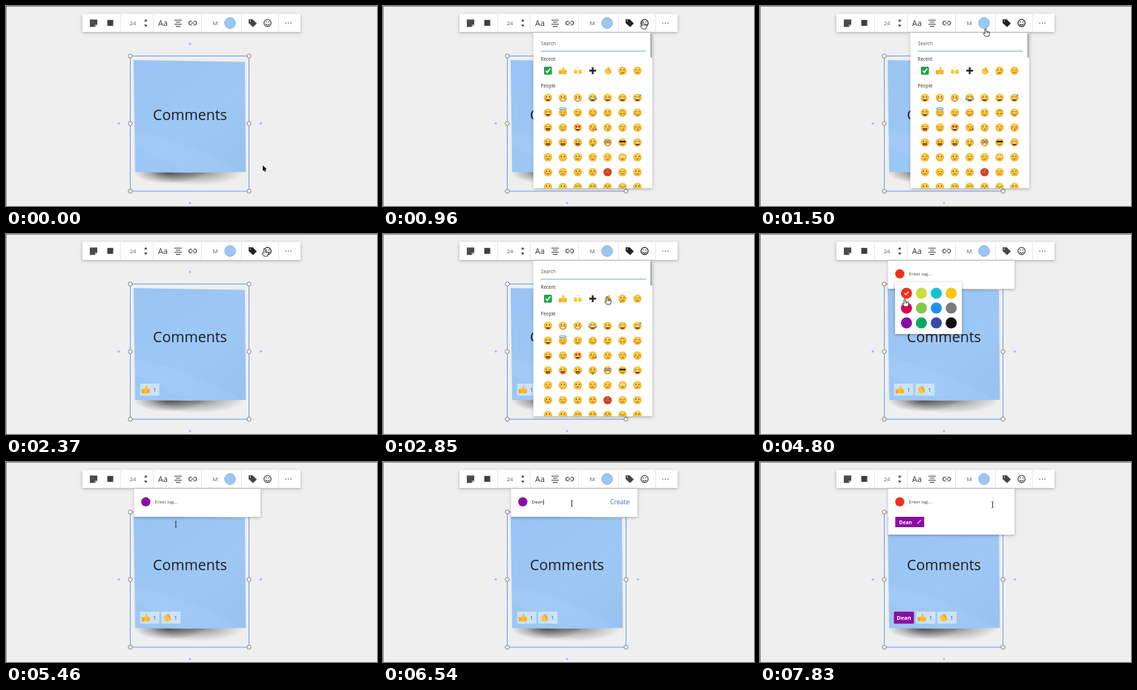
Animation of 500x270 px, one loop 7860 ms. Source, as an HTML page with a canvas:

```html
<!DOCTYPE html>
<html lang="en">
<head>
<meta charset="utf-8">
<title>Sticky note reactions and tags</title>
<style>
html, body { margin: 0; width: 100%; height: 100%; overflow: hidden; background: #efefef; }
canvas { display: block; width: 500px; height: 270px; }
</style>
</head>
<body>
<canvas id="stage"></canvas>
<script>
const LOOP = 7860, TAU = Math.PI * 2;
const FONT = '"Open Sans", "Noto Sans", sans-serif';
const NAME = 'Dean';
const BLUE = '#9cc6f4', RED = '#f0301a', VIOLET = '#890fa2', INK = '#3c3c3c';
const canvas = document.getElementById('stage');
const c = canvas.getContext('2d');
const dpr = window.devicePixelRatio || 1;
canvas.width = 500 * dpr;
canvas.height = 270 * dpr;

// time, x, y, pointer kind (a: arrow, h: hand, i: text)
const PATH = [
  [0, 346, 215, 'a'], [250, 346, 215, 'a'], [780, 350, 21, 'h'],
  [1250, 350, 21, 'h'], [1500, 304, 31, 'h'], [1730, 242, 85, 'h'],
  [1880, 242, 85, 'h'], [2300, 348, 20, 'h'], [2540, 348, 20, 'h'],
  [2850, 302, 85, 'h'], [3020, 302, 85, 'a'], [3400, 343, 41, 'a'],
  [3540, 343, 41, 'a'], [3720, 332, 21, 'h'], [4020, 332, 21, 'h'],
  [4350, 188, 54, 'h'], [4520, 188, 54, 'h'], [4720, 195, 88, 'h'],
  [4850, 195, 88, 'h'], [5120, 197, 119, 'h'], [5300, 197, 119, 'i'],
  [5600, 254.5, 56, 'i'], [6570, 254.5, 56, 'i'], [6820, 318, 54, 'h'],
  [6990, 318, 54, 'i'], [7200, 313.5, 57.5, 'i'], [LOOP, 313.5, 57.5, 'i']
];

const PALETTE = [
  RED, '#c4e33a', '#12c3d2', '#fbc40d',
  '#df0052', '#80cc45', '#2190f4', '#7a7a7a',
  VIOLET, '#10a566', '#3947a6', '#111111'
];

// eyes, mouth, optional extra
const FACES = [
  'oD ot ot ^Dt oD ^D ^Ds',
  'xD u)a w) ^)b o) o)v ^)b',
  '^T u) hD w*k o* ^* u*b',
  'wT xT oT o)$ gt s) ^D',
  '-/ o. o- -- -/ r- o/',
  'o-b u( o( x( x(R u( o/',
  'o( o( x( x( xO uO x('
].map(row => row.split(' '));

function fill(color) { c.fillStyle = color; c.fill(); }
function line(color, w) { c.strokeStyle = color; c.lineWidth = w; c.stroke(); }
function disc(x, y, r, color) { c.beginPath(); c.arc(x, y, r, 0, TAU); fill(color); }
function ring(x, y, r, color, w) { c.beginPath(); c.arc(x, y, r, 0, TAU); line(color, w); }
function rect(x, y, w, h, color) { c.fillStyle = color; c.fillRect(x, y, w, h); }
function box(x, y, w, h, r, color) { c.beginPath(); c.roundRect(x, y, w, h, r); fill(color); }
function poly(color, ...p) {
  c.beginPath();
  for (let i = 0; i < p.length; i += 2) c.lineTo(p[i], p[i + 1]);
  c.closePath();
  fill(color);
}
function seg(color, w, ...p) {
  c.beginPath();
  for (let i = 0; i < p.length; i += 2) c.lineTo(p[i], p[i + 1]);
  line(color, w);
}
function arc(x, y, r, a, b, color, w) {
  c.beginPath();
  c.arc(x, y, r, a * Math.PI, b * Math.PI);
  line(color, w);
}
function text(s, x, y, size, color, align = 'left', weight = 400) {
  c.font = `${weight} ${size}px ${FONT}`;
  c.fillStyle = color;
  c.textAlign = align;
  c.fillText(s, x, y);
}
function at(x, y, scale, draw) {
  c.save();
  c.translate(x, y);
  c.scale(scale, scale);
  draw();
  c.restore();
}
function card(x, y, w, h) {
  c.save();
  c.shadowColor = 'rgba(0,0,0,.3)';
  c.shadowBlur = 4 * dpr;
  c.shadowOffsetY = dpr;
  rect(x, y, w, h, '#fff');
  c.restore();
}

function shade(x, y, rx, ry, alpha) {
  c.save();
  c.translate(x, y);
  c.scale(rx, ry);
  const g = c.createRadialGradient(0, 0, 0, 0, 0, 1);
  g.addColorStop(0, `rgba(30,25,25,${alpha})`);
  g.addColorStop(.5, `rgba(30,25,25,${alpha * .45})`);
  g.addColorStop(1, 'rgba(30,25,25,0)');
  disc(0, 0, 1, g);
  c.restore();
}

function note(textY) {
  shade(220, 224, 48, 16, .75);
  shade(258, 224, 64, 18, .5);
  const g = c.createLinearGradient(180, 74, 300, 225);
  g.addColorStop(0, '#99c4f3');
  g.addColorStop(.6, '#9dc7f5');
  g.addColorStop(1, '#98c3f1');
  c.beginPath();
  c.moveTo(172, 73);
  c.lineTo(322, 75.5);
  c.lineTo(323.3, 224);
  c.quadraticCurveTo(250, 226, 174, 224);
  c.closePath();
  fill(g);
  c.beginPath();
  c.moveTo(173, 168);
  c.quadraticCurveTo(235, 178, 318, 224);
  c.lineTo(240, 224);
  c.quadraticCurveTo(200, 200, 173, 190);
  fill('rgba(255,255,255,.05)');
  text('Comments', 248, textY, 19.6, '#1d1d1f', 'center');
}

function selection() {
  c.strokeStyle = '#6d9be6';
  c.lineWidth = 1;
  c.strokeRect(167.5, 67.5, 160, 182.5);
  for (const x of [167.5, 327.5]) for (const y of [67.5, 158.7, 250]) {
    disc(x, y, 2.7, '#fff');
    ring(x, y, 2.7, '#707070', .9);
  }
  for (const [x, y] of [[248, 51], [152, 158.5], [343.5, 158.5], [248, 266]])
    disc(x, y, 1.6, '#abb6f6');
}

function thumb() {
  c.beginPath();
  c.moveTo(-2.5, -.5);
  c.quadraticCurveTo(.2, -2.5, .2, -5.5);
  c.quadraticCurveTo(2.6, -6, 2, -1.2);
  c.lineTo(5, -1);
  c.quadraticCurveTo(6.2, .4, 5.2, 1.6);
  c.quadraticCurveTo(5.8, 4.8, 3.6, 5.3);
  c.lineTo(-2.5, 4.8);
  c.closePath();
  fill('#fcc12c');
  for (const y of [.9, 2.6, 4.1]) seg('#df9420', .5, 1.6, y, 5, y);
  box(-5.6, -.5, 3.4, 5.6, .8, '#f3a728');
}

function palm(angle, color) {
  c.save();
  c.rotate(angle);
  box(-2.6, -1, 5.4, 5.8, 2, color);
  c.lineCap = 'round';
  for (let i = 0; i < 4; i++)
    seg(color, 1.25, -1.9 + i * 1.35, 1, -2.2 + i * 1.5, -3.7 + Math.abs(i - 1.4) * .6);
  seg(color, 1.4, -2, 3, -3.9, .2);
  c.restore();
}
function clap() {
  at(1.2, -.2, 1, () => palm(-.5, '#e99b22'));
  at(-.4, .9, 1, () => palm(-.75, '#fdc735'));
  seg('#e7a02b', .7, 1.3, -5.6, 1.8, -4.2);
  seg('#e7a02b', .7, 4.2, -5.2, 3.6, -4);
}
function raised() {
  at(-3, 1, .72, () => palm(-.18, '#fcc12c'));
  at(3, 1, .72, () => { c.scale(-1, 1); palm(-.18, '#fcc12c'); });
  for (const x of [-1.2, 0, 1.2]) seg('#e3a33a', .5, x, -5, x * .7, -3.6);
}

const DARK = '#64420f';
const eyes = {
  o(x) { c.beginPath(); c.ellipse(x, -1.3, .7, 1, 0, 0, TAU); fill(DARK); },
  '^'(x) { arc(x, -.8, 1, 1, 2, DARK, .7); },
  u(x) { arc(x, -1.5, 1, 0, 1, DARK, .7); },
  '-'(x) { seg(DARK, .8, x - 1, -1.2, x + 1, -1.2); },
  x(x) { const s = Math.sign(x); seg(DARK, .7, x + s, -2.3, x - s, -1.3, x + s, -.6); },
  w(x) { x < 0 ? eyes.o(x) : eyes.u(x); },
  h(x) {
    disc(x - .7, -1.8, 1, '#e3262f');
    disc(x + .7, -1.8, 1, '#e3262f');
    poly('#e3262f', x - 1.6, -1.4, x + 1.6, -1.4, x, .8);
  },
  g(x) { disc(x, -1.2, 1.7, '#fff'); ring(x, -1.2, 1.7, '#333', .7); disc(x, -1.2, .6, DARK); },
  s(x) { box(x - 2.2, -2.5, 4.4, 2.6, 1, '#222'); },
  r(x) { disc(x, -1.5, 1.4, '#fff'); disc(x, -2.1, .7, DARK); }
};
function grin(color) {
  c.beginPath();
  c.arc(0, 1, 3.1, 0, Math.PI);
  c.closePath();
  fill(color);
}
const mouths = {
  D() { grin('#6b3a12'); rect(-2.5, 1, 5, .9, '#fff'); },
  t() { grin('#fff'); c.lineWidth = .5; c.strokeStyle = DARK; c.stroke(); },
  ')'() { arc(0, .6, 2.5, .12, .88, DARK, .75); },
  '('() { arc(0, 4, 2, 1.15, 1.85, DARK, .75); },
  '-'() { seg(DARK, .75, -1.8, 2.4, 1.8, 2.4); },
  '/'() { seg(DARK, .75, -1.6, 2.8, 1.8, 1.9); },
  T() { grin('#6b3a12'); box(-1.1, 2, 2.3, 2.7, 1, '#ec4c65'); },
  '*'() { arc(.2, 1.8, .7, 1.4, 2.6, DARK, .6); arc(.2, 3.1, .7, 1.4, 2.6, DARK, .6); },
  O() { disc(0, 2.6, 1.6, '#6b3a12'); },
  '.'() {}
};
const extras = {
  a() { c.beginPath(); c.ellipse(0, -5.4, 4.5, 1.4, 0, 0, TAU); line('#4fa9e8', 1.1); },
  t() { disc(-4.4, 1.2, 1.5, '#4fb2ee'); disc(4.4, 1.2, 1.5, '#4fb2ee'); },
  s() { disc(4, -3.4, 1.3, '#4fb2ee'); },
  b() { disc(-3.6, 1, 1.1, 'rgba(240,90,60,.5)'); disc(3.6, 1, 1.1, 'rgba(240,90,60,.5)'); },
  k() { disc(4, 2.6, 1.3, '#e3262f'); },
  $() { box(-1, 2.5, 2, 3, .5, '#4c9a4a'); }
};
function face([eye, mouth, extra]) {
  const g = c.createRadialGradient(0, -2, 1, 0, 0, 6);
  g.addColorStop(0, extra === 'R' ? '#f0633c' : '#ffdc52');
  g.addColorStop(1, extra === 'R' ? '#cf2d22' : '#f5ab27');
  disc(0, 0, 5.6, g);
  if (extra === 'v') c.rotate(Math.PI);
  eyes[eye](-2);
  eyes[eye](2);
  mouths[mouth]();
  if (extras[extra]) extras[extra]();
}

const recent = [
  () => {
    box(-5.5, -5.5, 11, 11, 1.5, '#1fa34a');
    seg('#fff', 1.7, -3, .2, -.9, 2.4, 3.2, -2.8);
  },
  thumb, raised,
  () => { rect(-4.8, -1.2, 9.6, 2.4, '#222'); rect(-1.2, -4.8, 2.4, 9.6, '#222'); },
  clap,
  () => { face('o/'); c.lineCap = 'round'; seg('#e08f1e', 1.6, -3.5, 5, -1.5, 4.2, 1.2, 3.6); },
  () => face('-(')
];

function picker() {
  card(202.5, 36, 160.5, 210);
  c.save();
  c.beginPath();
  c.rect(202.5, 36, 160.5, 210);
  c.clip();
  rect(360.5, 36.5, 2, 33, '#9b9b9b');
  text('Search', 213, 52.7, 6.3, '#555');
  rect(212.5, 60.5, 142, 1, '#7ba7cc');
  text('Recent', 212.5, 73.6, 6.3, '#333');
  text('People', 212.5, 110, 6.3, '#333');
  const col = i => 222.3 + i * 20.1;
  recent.forEach((draw, i) => at(col(i), 87.3, .97, draw));
  FACES.forEach((row, j) => row.forEach((f, i) => at(col(i), 124 + j * 20.05, 1, () => face(f))));
  c.restore();
}

function toolbar(hot) {
  card(103, 10.5, 294, 24.5);
  for (const x of [154, 198, 263, 317, 367]) rect(x, 11, 1, 24, '#e9e9e9');
  poly('#4a4a4a', 113, 18.3, 123, 18.3, 123, 25, 119.7, 28.3, 113, 28.3);
  poly('#aaa', 123, 25, 119.7, 25, 119.7, 28.3);
  rect(136.5, 18.8, 8, 8, '#3e3e3e');
  text('24', 171, 25.8, 7.6, '#666', 'center');
  poly(INK, 186, 20.8, 188.3, 17.8, 190.6, 20.8);
  poly(INK, 186, 25.2, 188.3, 28.2, 190.6, 25.2);
  text('Aa', 211.5, 27, 10.8, INK, 'center');
  [[227, 10], [229, 6], [227, 10], [229, 6]].forEach(([x, w], i) => rect(x, 18.6 + i * 2.8, w, 1, INK));
  arc(249, 23, 2.5, .5, 1.5, INK, 1.1);
  arc(254.2, 23, 2.5, 1.5, 2.5, INK, 1.1);
  seg(INK, 1.1, 249, 20.5, 250.5, 20.5);
  seg(INK, 1.1, 249, 25.5, 250.5, 25.5);
  seg(INK, 1.1, 252.7, 20.5, 254.2, 20.5);
  seg(INK, 1.1, 252.7, 25.5, 254.2, 25.5);
  seg(INK, 1.1, 249.4, 23, 253.8, 23);
  text('M', 282, 26, 8, '#666', 'center');
  disc(302, 23, 7.4, BLUE);
  ring(302, 23, 7.3, '#83aeda', .8);
  poly(hot ? '#222' : '#454545', 327, 18, 332.5, 18, 338, 23.6, 333, 28.4, 327, 23);
  disc(329.2, 20.2, .8, '#fff');
  const ink = hot ? '#1c1c1c' : '#444';
  ring(352.5, 23, 4.8, ink, 1.2);
  disc(350.7, 21.6, .8, ink);
  disc(354.3, 21.6, .8, ink);
  arc(352.5, 23.4, 2.5, .08, .92, ink, 1.1);
  for (const x of [377, 380.5, 384]) disc(x, 23, .85, '#666');
}

function badge(x, icon) {
  box(x, 202, 26, 16.3, 1, 'rgba(255,255,255,.48)');
  at(x + 7.8, 210, 1.02, icon);
  text('1', x + 19.6, 213, 7.8, '#4a5868', 'center');
}

function tagPanel(t) {
  const made = t >= 6930;
  card(172.5, 36, 170.5, made ? 62 : 38);
  disc(188.4, 53.8, 6.2, t >= 5230 && !made ? VIOLET : RED);
  const typed = made ? 0 : Math.max(0, Math.min(4, Math.floor((t - 5650) / 170)));
  if (typed) {
    const s = NAME.slice(0, typed);
    text(s, 200.8, 56.4, 6, '#222');
    rect(201.2 + c.measureText(s).width, 50.5, .7, 7.5, '#222');
    text('Create', 306, 57.4, 8.6, '#3d70b2');
  } else text('Enter tag...', 200.8, 56.4, 6.1, '#444');
  if (made) {
    box(182.3, 74, 39, 14, 1, VIOLET);
    text(NAME, 187.5, 83.6, 6.7, '#fff', 'left', 700);
    seg('#e8c5ee', 1.2, 212, 83.2, 216, 79.2);
    disc(216.4, 78.8, .7, '#e8c5ee');
  }
  if (t >= 4450 && t < 5230) {
    card(182, 65, 90, 70);
    PALETTE.forEach((color, i) =>
      disc(197.4 + i % 4 * 20.1, 80 + Math.floor(i / 4) * 20, 7.5, color));
    seg('#fff', 1.2, 194.8, 80, 196.7, 82, 200.3, 77.8);
  }
}

const pointers = {
  a() {
    c.beginPath();
    [0, 0, 0, 8, 1.8, 6.4, 3, 9, 4.4, 8.4, 3.3, 5.8, 5.6, 5.6].forEach((v, i, p) => {
      if (i % 2) c.lineTo(p[i - 1], v);
    });
    c.closePath();
    line('#fff', 1.4);
    fill('#111');
  },
  h() {
    c.beginPath();
    c.moveTo(-1, .4);
    c.quadraticCurveTo(0, -.9, 1, .4);
    c.lineTo(1.1, 3.4);
    c.lineTo(4.9, 4.1);
    c.quadraticCurveTo(5.8, 4.6, 5.4, 6.4);
    c.lineTo(4.5, 10);
    c.lineTo(-.4, 10);
    c.lineTo(-3.1, 6.3);
    c.quadraticCurveTo(-3, 4.7, -1, 6.2);
    c.closePath();
    fill('#fff');
    line('#222', .85);
    for (const x of [1, 2.5, 4]) seg('#222', .6, x, 4, x, 5.9);
  },
  i() {
    seg('#222', .9, 0, -3, 0, 3);
    arc(-1.2, -3, 1.2, 1.5, 2, '#222', .8);
    arc(1.2, -3, 1.2, 1, 1.5, '#222', .8);
    arc(-1.2, 3, 1.2, 0, .5, '#222', .8);
    arc(1.2, 3, 1.2, .5, 1, '#222', .8);
  }
};
function pointer(t) {
  const n = PATH.findIndex(k => k[0] > t);
  const [t0, x0, y0, kind] = PATH[n - 1], [t1, x1, y1] = PATH[n];
  const u = (t - t0) / (t1 - t0), e = u * u * (3 - 2 * u);
  at(x0 + (x1 - x0) * e, y0 + (y1 - y0) * e, 1, pointers[kind]);
}

function render(t) {
  c.setTransform(dpr, 0, 0, dpr, 0, 0);
  rect(0, 0, 500, 270, '#efefef');
  rect(0, 0, 500, 1, '#8c8c8c');
  rect(0, 0, 1, 270, '#8c8c8c');
  const liked = t >= 1830, clapped = t >= 2970, tagged = t >= 6930;
  note(liked ? 146.3 : 154.3);
  const shift = tagged ? 29.7 : 0;
  if (tagged) {
    box(180.5, 202, 27, 16.3, 1, VIOLET);
    text(NAME, 194, 213, 7.5, '#fff', 'center', 700);
  }
  if (liked) badge(180.7 + shift, thumb);
  if (clapped) badge(209.2 + shift, clap);
  selection();
  const picking = (t >= 950 && t < 1830) || (t >= 2490 && t < 2970);
  toolbar(picking || (t >= 780 && t < 2970));
  if (picking) picker();
  if (t >= 3840) tagPanel(t);
  pointer(t);
}

const start = performance.now();
function tick() {
  render((performance.now() - start) % LOOP);
  requestAnimationFrame(tick);
}
tick();
</script>
</body>
</html>
```
